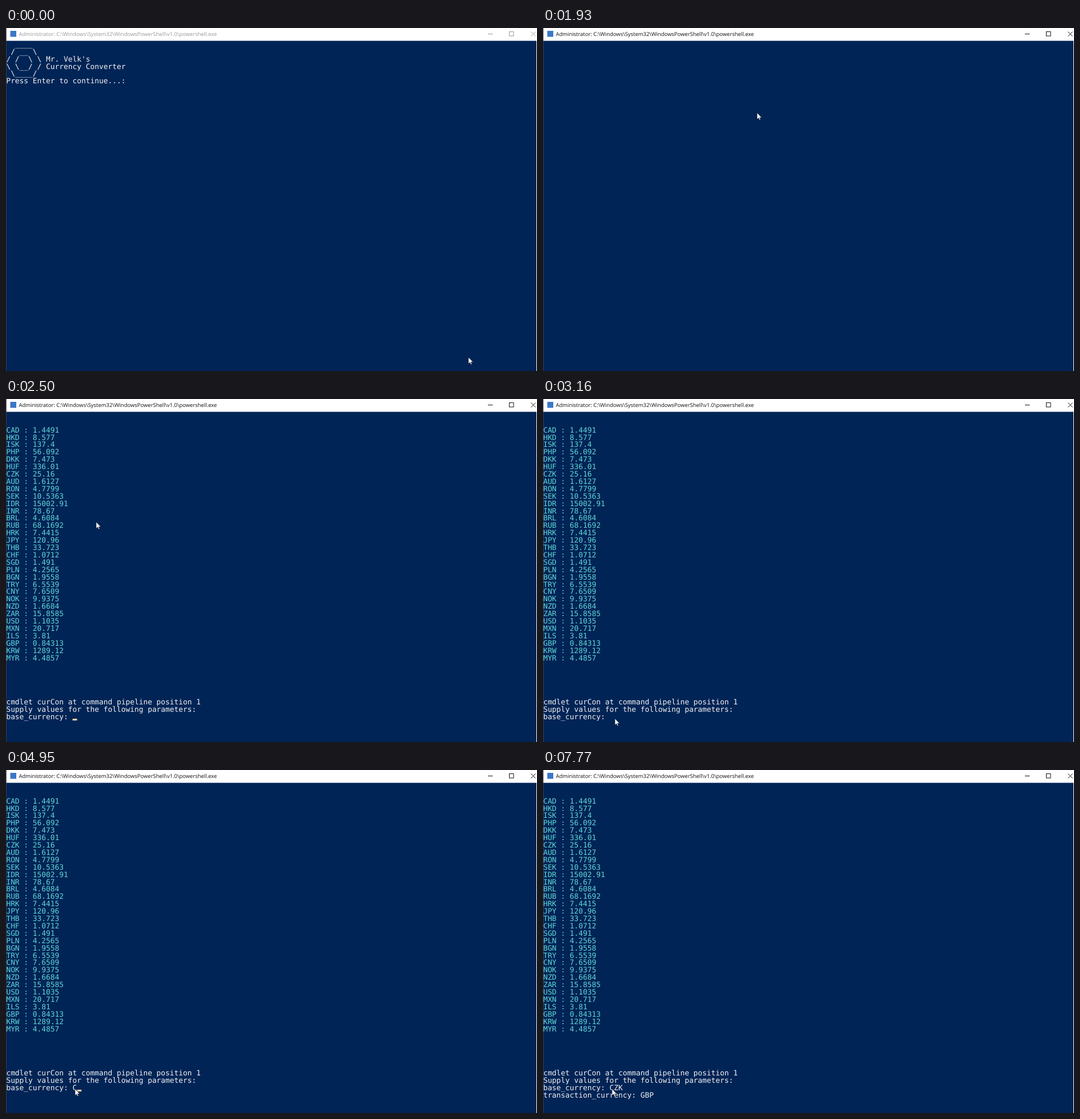
Write an HTML page that moves like this. It is 930 px wide and 602 px high and loops after 8 s.

```html
<!DOCTYPE html>
<html lang="en">
<head>
<meta charset="utf-8">
<title>Currency Converter</title>
<style>
html, body { margin: 0; width: 100%; height: 100%; overflow: hidden; background: #fff; }
svg { display: block; width: 930px; height: 602px; }
text { white-space: pre; text-rendering: geometricPrecision; }
#rows text { font: 12.87px "DejaVu Sans Mono", monospace; }
#title { font: 9.45px "Open Sans", "Noto Sans", sans-serif; }
</style>
</head>
<body>
<svg viewBox="0 0 930 602" xmlns="http://www.w3.org/2000/svg">
  <rect width="930" height="602" fill="#fff"/>
  <rect y="22.5" width="929" height="580" fill="#012456"/>
  <rect width="0.8" height="602" fill="#3c4758"/>
  <rect x="7.5" y="5" width="10.5" height="10.5" fill="#3a78c8"/>
  <text id="title" x="22.5" y="14"></text>
  <g id="buttons" fill="none" stroke-width="1">
    <path d="M844 10.5h8.5"/>
    <rect x="881.5" y="6.5" width="7.5" height="7.5"/>
    <path d="M919.5 6.5l8 8m0-8l-8 8"/>
  </g>
  <g id="rows"></g>
  <rect id="block" width="7.75" height="12.9" fill="#fedba9"/>
  <rect id="caret" width="7.75" height="3"/>
  <path id="mouse" d="M0 0V11.2L2.6 8.8 4.2 12.6 5.9 11.9 4.3 8.2H7.9Z" fill="#fff" stroke="#0a0f1c" stroke-width="0.5"/>
</svg>
<script>
const LOOP = 8000, CW = 7.75, RH = 12.9, TOP = 22.5;
const WHITE = '#f2f2f2', CYAN = '#61d6d6', CREAM = '#fedba9', NAVY = '#012456';
const PATH = 'Administrator: C:\\Windows\\System32\\WindowsPowerShell\\v1.0\\powershell.exe';
const el = id => document.getElementById(id);
const title = el('title'), buttons = el('buttons'), rows = el('rows');
const block = el('block'), caret = el('caret'), mouse = el('mouse');

const banner = [
  '  ____',
  ' / __ \\',
  '/ /  \\ \\ Mr. Velk\'s',
  '\\ \\__/ / Currency Converter',
  ' \\____/',
  'Press Enter to continue...: '
];

const rates = ('CAD 1.4491,HKD 8.577,ISK 137.4,PHP 56.092,DKK 7.473,HUF 336.01,CZK 25.16,' +
  'AUD 1.6127,RON 4.7799,SEK 10.5363,IDR 15002.91,INR 78.67,BRL 4.6084,RUB 68.1692,' +
  'HRK 7.4415,JPY 120.96,THB 33.723,CHF 1.0712,SGD 1.491,PLN 4.2565,BGN 1.9558,' +
  'TRY 6.5539,CNY 7.6509,NOK 9.9375,NZD 1.6684,ZAR 15.8585,USD 1.1035,MXN 20.717,' +
  'ILS 3.81,GBP 0.84313,KRW 1289.12,MYR 4.4857').split(',').map(r => r.replace(' ', ' : '));

// Step tracks: [start time, value...], each held until the next.
const baseKeys = [[0, ''], [4950, 'C'], [5110, 'CZ'], [5340, 'CZK']];
const quoteKeys = [[0, ''], [7220, 'G'], [7290, 'GB'], [7370, 'GBP']];
const caretKeys = [[0, 0], [910, 1], [1460, 0], [2460, 1], [3000, 0], [3540, 1], [4090, 0],
  [4570, 1], [5110, 0], [5340, 1], [5660, 0], [6120, 1], [6670, 0], [7140, 1], [7770, 0]];
const blockKeys = [[0, -1], [3310, 16], [4320, 15], [4950, -1]];
const mouseKeys = [[0, 810, 578], [70, 772, 536], [150, 660, 420], [220, 520, 278], [300, 415, 186],
  [370, 375, 149], [2310, 322, 159], [2400, 228, 188], [2500, 158, 216], [2620, 139, 280],
  [2700, 131, 352], [2770, 127, 424], [2850, 125, 490], [2930, 125, 538], [3000, 126, 562],
  [3080, 126, 570], [3160, 126, 561], [3940, 126, 560], [4090, 124, 560], [4240, 121, 560]];

const hold = (keys, t) => keys.reduce((a, k) => k[0] <= t ? k : a).slice(1);
const colX = c => 0.4 + c * CW;
const rowY = r => TOP + r * RH;

function screen(t) {
  const out = [];
  const put = (row, text, fill = WHITE) => out.push({ row, text, fill });
  if (t < 1610) banner.forEach((s, i) => put(i, s));
  if (t >= 2010) rates.forEach((s, i) => put(i + 2, s, CYAN));
  if (t >= 2080) {
    put(39, 'cmdlet curCon at command pipeline position 1');
    put(40, 'Supply values for the following parameters:');
    put(41, 'base_currency: ' + hold(baseKeys, t)[0]);
  }
  if (t >= 6050) put(42, 'transaction_currency: ' + hold(quoteKeys, t)[0]);
  return out;
}

let shown = '';
function drawRows(lines) {
  const key = JSON.stringify(lines);
  if (key === shown) return;
  shown = key;
  rows.replaceChildren(...lines.map(l => {
    const n = document.createElementNS('http://www.w3.org/2000/svg', 'text');
    n.setAttribute('x', colX(0));
    n.setAttribute('y', rowY(l.row) + 10.3);
    n.setAttribute('fill', l.fill);
    n.textContent = l.text;
    return n;
  }));
}

function place(node, col, row, dy = 0) {
  node.setAttribute('x', colX(col));
  node.setAttribute('y', rowY(row) + dy);
}

function draw(t) {
  const active = t >= 370;
  title.textContent = (t >= 3310 && t < 4950 ? 'Select ' : '') + PATH;
  title.setAttribute('fill', active ? '#111' : '#999');
  buttons.setAttribute('stroke', active ? '#111' : '#999');

  const lines = screen(t), last = lines[lines.length - 1];
  drawRows(lines);

  const cell = hold(blockKeys, t)[0];
  block.style.display = cell < 0 ? 'none' : '';
  if (cell >= 0) place(block, cell, 41);

  const on = last && hold(caretKeys, t)[0];
  caret.style.display = on ? '' : 'none';
  if (on) {
    place(caret, last.text.length, last.row, 9.8);
    caret.setAttribute('fill', cell === last.text.length ? NAVY : CREAM);
  }

  const [x, y] = hold(mouseKeys, t);
  mouse.setAttribute('transform', `translate(${x} ${y})`);
}

const start = performance.now();
function tick(now) {
  draw(Math.max(0, now - start) % LOOP);
  requestAnimationFrame(tick);
}
draw(0);
requestAnimationFrame(tick);
</script>
</body>
</html>
```
